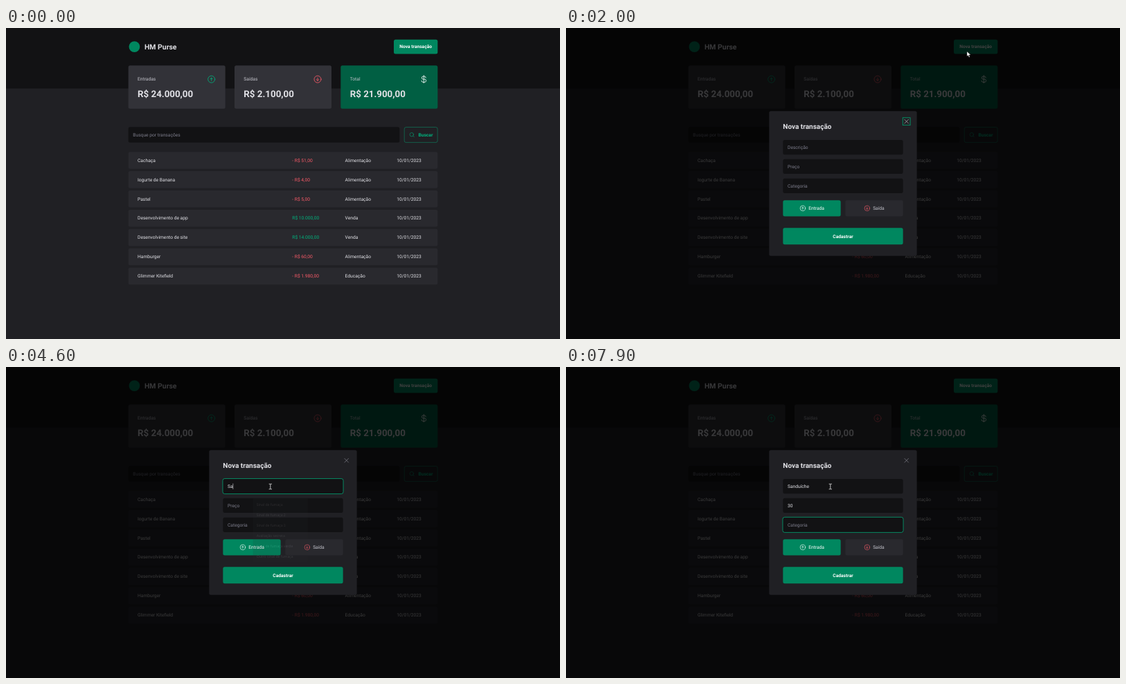
Write an HTML page that moves like this. It is 800x450 px and loops after 8000 ms.

```html
<!DOCTYPE html>
<html lang="pt-BR">
<head>
<meta charset="utf-8">
<title>Nova transação</title>
<style>
  html, body { margin: 0; width: 100%; height: 100%; overflow: hidden; background: #202024; }
  svg { display: block; width: 100vw; height: 100vh; font-family: Roboto, sans-serif; text-rendering: geometricPrecision; }
  text { white-space: pre; }
</style>
</head>
<body>
<svg id="stage" viewBox="0 0 1920 1080"></svg>
<script>
const LOOP = 8000, STEP = 100;
const C = {
  ink: '#121214', body: '#202024', row: '#29292e', card: '#323238',
  text: '#e1e1e6', soft: '#c4c4cc', hint: '#7c7c8a',
  green: '#00875f', dark: '#015f43', light: '#00b37e', focus: '#009c6d', red: '#f75a68'
};
const stage = document.getElementById('stage');
const ruler = document.createElement('canvas').getContext('2d');

// Drawing helpers; coordinates belong to a 1920 x 1080 page.
const rect = (x, y, w, h, fill, r = 6, extra = '') =>
  `<rect x="${x}" y="${y}" width="${w}" height="${h}" rx="${r}" fill="${fill}" ${extra}/>`;
const text = (str, x, cy, fill = C.text, size = 16, weight = 400, extra = '') =>
  `<text x="${x}" y="${cy + size * .342}" fill="${fill}" font-size="${size}" font-weight="${weight}" ${extra}>${str}</text>`;
const icon = (shape, cx, cy, size, color) =>
  `<g transform="translate(${cx} ${cy}) scale(${size / 256}) translate(-128 -128)" fill="none" stroke="${color}"
    stroke-width="16" stroke-linecap="round" stroke-linejoin="round">${shape}</g>`;
const ring = (x, y, w, h, r) => rect(x - 1, y - 1, w + 2, h + 2, 'none', r, `stroke="${C.focus}" stroke-width="2"`);
const middle = 'text-anchor="middle"';

const ICON = {
  up: '<circle cx="128" cy="128" r="96"/><path d="M94 122l34-34 34 34M128 168V88"/>',
  down: '<circle cx="128" cy="128" r="96"/><path d="M94 134l34 34 34-34M128 88v80"/>',
  dollar: '<path d="M128 24v208M184 88a40 40 0 0 0-40-40h-32a40 40 0 0 0 0 80h40a40 40 0 0 1 0 80h-48a40 40 0 0 1-40-40"/>',
  search: '<circle cx="116" cy="116" r="84"/><path d="M175 175l49 49"/>',
  close: '<path d="M200 56L56 200M200 200L56 56"/>'
};

const CARDS = [
  ['Entradas', 'R$ 24.000,00', C.card, ICON.up, C.light],
  ['Saídas', 'R$ 2.100,00', C.card, ICON.down, C.red],
  ['Total', 'R$ 21.900,00', C.dark, ICON.dollar, '#fff']
];
const ROWS = [
  ['Cachaça', '- R$ 51,00', 'Alimentação'],
  ['Iogurte de Banana', '- R$ 4,00', 'Alimentação'],
  ['Pastel', '- R$ 5,00', 'Alimentação'],
  ['Desenvolvimento de app', 'R$ 10.000,00', 'Venda'],
  ['Desenvolvimento de site', 'R$ 14.000,00', 'Venda'],
  ['Hamburger', '- R$ 60,00', 'Alimentação'],
  ['Glimmer Kitefield', '- R$ 1.980,00', 'Educação']
];
const HISTORY = ['just a road that never ends', 'Sinal de fumaça 2', 'Avaliação secreta',
  'Sinal de fumaça', 'Grupo 1', 'Outro sinal de fumaça'];
const MATCHES = ['Sinal de fumaça', 'Sinal de fumaça 2', 'Sinal de fumaça 3',
  'Avaliação secreta', 'Sinal de fumaça verde', 'Outro sinal de fumaça'];

// Times at which each character appears.
const FIELDS = [
  { hint: 'Descrição', value: 'Sanduíche', keys: [4100, 4500, 4800, 4900, 5000, 5600, 5700, 5900, 6000], from: 2700, to: 6200 },
  { hint: 'Preço', value: '30', keys: [7100, 7200], from: 6200, to: 7500 },
  { hint: 'Categoria', value: '', keys: [], from: 7500, to: LOOP }
];
const CARET_OFF = [[3100, 3600], [4000, 4100], [6800, 7100], [7900, 8000]];

// Pointer stops: time, x, y in 800 x 450 units.
const PATH = [[100, 660, 140], [300, 520, 240], [500, 410, 260], [700, 382, 200], [900, 386, 153],
  [1000, 387, 152], [1100, 387, 152], [1900, 579, 34], [2000, 579, 34], [2500, 381.8, 173]];

function page(t) {
  const button = t === 1800 || t === 1900 ? '#047d59' : C.green;
  let s = rect(0, 0, 1920, 1080, C.body, 0) + rect(0, 0, 1920, 210, C.ink, 0);
  s += `<circle cx="445" cy="65" r="19" fill="${C.green}"/>` + text('HM Purse', 480, 65, C.text, 25, 700);
  s += rect(1344, 40, 152, 50, button) + text('Nova transação', 1420, 65, '#fff', 16, 700, middle);
  CARDS.forEach(([label, sum, fill, shape, color], i) => {
    const x = 424 + 368 * i;
    s += rect(x, 130, 336, 150, fill) + text(label, x + 32, 178, C.soft)
      + icon(shape, x + 288, 178, 32, color) + text(sum, x + 32, 229, C.text, 32, 700);
  });
  s += rect(424, 344, 940, 54, C.ink) + text('Busque por transações', 440, 371, C.hint);
  s += rect(1380.5, 344.5, 115, 53, 'none', 6, `stroke="${C.light}"`)
    + icon(ICON.search, 1407, 371, 20, C.light) + text('Buscar', 1429, 371, C.light, 16, 700);
  ROWS.forEach(([name, price, kind], i) => {
    const y = 430 + 67 * i, cy = y + 29.5;
    s += rect(424, y, 1072, 59, C.row) + text(name, 456, cy)
      + text(price, 992, cy, price[0] === '-' ? C.red : C.light)
      + text(kind, 1175, cy) + text('10/01/2023', 1354, cy);
  });
  return s;
}

function field(f, i, t) {
  const y = 388.5 + 67 * i, cy = y + 26;
  const typed = f.value.slice(0, f.keys.filter(k => k <= t).length);
  let s = rect(752, y, 416, 51, C.ink) + text(typed || f.hint, 768, cy, typed ? C.text : C.hint);
  if (t < f.from || t >= f.to) return s;
  s += ring(752, y, 416, 51, 7);
  if (!CARET_OFF.some(([a, b]) => t >= a && t < b)) {
    ruler.font = '16px Roboto, sans-serif';
    s += rect(768 + ruler.measureText(typed).width, cy - 10, 1.4, 20, C.text, 0);
  }
  if (i === 1) {
    s += rect(1137, cy - 10, 15, 20, '#e8e8e8', 1)
      + `<path d="M1141 ${cy - 3}l3.5-4 3.5 4zM1141 ${cy + 3}l3.5 4 3.5-4z" fill="#333"/>`;
  }
  return s;
}

function modal(t) {
  let s = rect(0, 0, 1920, 1080, '#000', 0, 'opacity=".75"') + rect(704, 288.5, 512, 503, C.body);
  s += text('Nova transação', 752, 342.5, C.text, 24, 700);
  s += icon(ICON.close, 1180, 324.5, 24, t < 2700 ? C.soft : '#8d8d99');
  if (t < 2700) s += ring(1168, 312.5, 24, 24, 0);
  s += FIELDS.map((f, i) => field(f, i, t)).join('');
  s += rect(752, 598, 200, 56, C.green) + icon(ICON.up, 820.5, 626, 24, '#fff') + text('Entrada', 840.5, 626, '#fff');
  s += rect(968, 598, 200, 56, C.row) + icon(ICON.down, 1043.5, 626, 24, C.red) + text('Saída', 1063.5, 626, C.soft);
  s += rect(752, 694, 416, 58, C.green) + text('Cadastrar', 960, 723, '#fff', 16, 700, middle);
  return s;
}

function suggestions(t) {
  if (t < 2700 || t >= 4800) return '';
  const alpha = t < 2800 ? .6 : t < 4500 ? 1 : [.35, .12, .06][(t - 4500) / STEP];
  const filtered = t >= 4100;
  const rows = (filtered ? MATCHES : HISTORY).map((r, i) =>
    text(r, 864, 472 + 36 * i, '#e8eaed', 12.3, 400, 'font-family="Open Sans, sans-serif"')).join('');
  return `<g opacity="${alpha}" transform="translate(${filtered ? '4 5' : '0 0'})">`
    + rect(852, 450, 190, 222, '#292a2d', 3) + rows + '</g>';
}

function pointer(t) {
  if (t < PATH[0][0]) return '';
  let [, x, y] = PATH[PATH.length - 1];
  const n = PATH.findIndex(p => p[0] > t);
  if (n > 0) {
    const [a, b] = [PATH[n - 1], PATH[n]];
    const k = (t - a[0]) / (b[0] - a[0]), e = k * k * (3 - 2 * k);
    x = a[1] + (b[1] - a[1]) * e;
    y = a[2] + (b[2] - a[2]) * e;
  }
  const inside = (l, top, r, bottom) => x > l && x < r && y > top && y < bottom;
  const open = t >= 2000;
  let shape;
  if (open ? inside(313, 162, 487, 240) : inside(177, 143, 568, 166))
    shape = '<path d="M-5-9h4l1 1 1-1h4M0-8V8M-5 9h4l1-1 1 1h4" fill="none" stroke="#e8e8e8" stroke-width="2"/>';
  else if (!open && inside(560, 16, 623, 38))
    shape = '<path d="M-2 0q2-2 4 0v8l7 2q3 1 2 5l-2 8H-1l-6-9q0-3 5-1z" fill="#fff" stroke="#222"/>';
  else
    shape = '<path d="M0 0v17l4-4 3 7 3-1-3-7h6z" fill="#fff" stroke="#222"/>';
  return `<g transform="translate(${x * 2.4} ${y * 2.4})">${shape}</g>`;
}

let last = -1;
function frame(now) {
  const t = Math.floor(now % LOOP / STEP) * STEP;
  if (t !== last) {
    last = t;
    stage.innerHTML = page(t) + (t >= 2000 ? modal(t) + suggestions(t) : '') + pointer(t);
  }
  requestAnimationFrame(frame);
}
requestAnimationFrame(frame);
</script>
</body>
</html>
```
